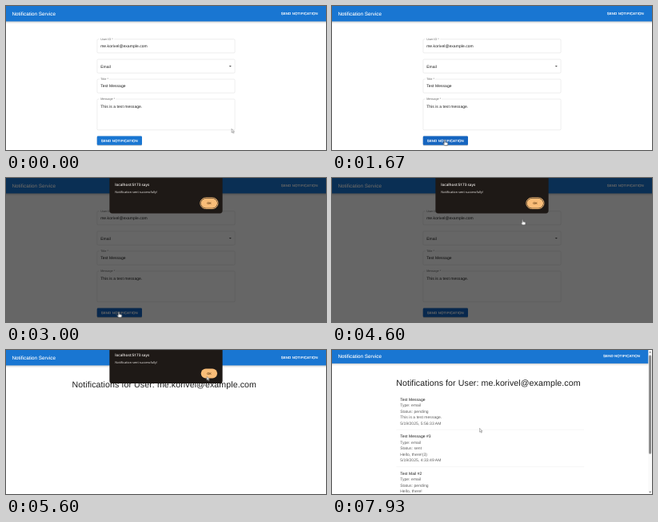
Recreate the animation shown at these times as an HTML page. Size 400x181 px, loop 8000 ms.

```html
<!DOCTYPE html>
<html lang="en">
<head>
<meta charset="utf-8">
<title>Notification Service</title>
<style>
  /* Typed properties keep moving text sharp: it is repainted, not resampled. */
  @property --gutter { syntax: "<length>"; inherits: true; initial-value: 0px; }
  @property --scroll { syntax: "<length>"; inherits: true; initial-value: 0px; }

  html, body { margin: 0; width: 100%; height: 100%; overflow: hidden; background: #fff; }
  svg { display: block; width: 100vw; height: 100vh; }
  text { font: 16px "Liberation Sans", Arial, sans-serif; letter-spacing: .15px; fill: #1c1c1c; text-rendering: geometricPrecision; }

  .bar { fill: #1976d2; filter: drop-shadow(0 3px 3px rgba(0, 0, 0, .25)); }
  .brand { font-size: 20px; fill: #fff; stroke: #fff; stroke-width: .3; }
  .action { font-size: 14px; letter-spacing: .4px; fill: #fff; stroke: #fff; stroke-width: .5; }
  .box { fill: none; stroke: rgba(0, 0, 0, .23); }
  .notch { fill: #fff; }
  .label { font-size: 12px; fill: #666; }
  .submit { filter: drop-shadow(0 2px 2px rgba(0, 0, 0, .3)); }
  .heading { font-size: 34px; letter-spacing: .25px; }
  .detail { fill: #5c5c5c; }
  .divider { stroke: rgba(0, 0, 0, .12); }
  .alert text { font-family: "Open Sans", sans-serif; letter-spacing: 0; fill: #f3efec; }
  .alert .host { font-size: 14.8px; font-weight: 600; }
  .alert .note { font-size: 12.3px; }
  .alert .ok { font-size: 12px; font-weight: 600; fill: #4c2a06; text-anchor: middle; }

  /* Every part shares one 8 s clock. */
  .page, .form, .results, .list, .submit, .dim, .alert, .ring,
  .thumb, .pointer, .arrow, .hand { animation: 8s linear infinite; }
  .form, .results, .list, .ring, .arrow, .hand { animation-timing-function: step-end; }

  .form { animation-name: form; }
  @keyframes form { 0% { visibility: visible } 68.75%, 100% { visibility: hidden } }
  .results { animation-name: results; }
  @keyframes results { 0% { visibility: hidden } 68.75%, 100% { visibility: visible } }
  .list { animation-name: list; }
  @keyframes list { 0% { visibility: hidden } 71.5%, 100% { visibility: visible } }

  .page { animation-name: page; transform: translateY(var(--scroll)); }
  @keyframes page {
    0%, 71.49% { --gutter: 0px; --scroll: 0px }
    71.5%, 96.5% { --gutter: 15px; --scroll: 0px }
    97.5% { --gutter: 15px; --scroll: -3px }
    99.1%, 100% { --gutter: 15px; --scroll: -8px }
  }
  .bar-action { transform: translateX(calc(-1 * var(--gutter))); }
  .heading { transform: translateX(calc(-.5 * var(--gutter))); }
  .thumb { animation-name: thumb; }
  @keyframes thumb { 0%, 96.5% { transform: none } 99.1%, 100% { transform: translateY(5px) } }

  .submit { animation-name: hover; }
  @keyframes hover { 0%, 9.5% { fill: #1976d2 } 12.5%, 100% { fill: #1565c0 } }
  .dim { animation-name: dim; }
  @keyframes dim { 0%, 34% { opacity: 0 } 35.2%, 67.8% { opacity: .6 } 69%, 100% { opacity: 0 } }
  .alert { animation-name: alert; }
  @keyframes alert {
    0%, 34% { opacity: 0; transform: translateY(-16px) }
    35.5%, 68.75% { opacity: 1; transform: none }
    70.2% { opacity: 1; transform: translateY(-8px) }
    71.3%, 100% { opacity: 0; transform: translateY(-16px) }
  }
  .ring { animation-name: ring; }
  @keyframes ring { 0% { visibility: visible } 68.5%, 100% { visibility: hidden } }

  .pointer { animation-name: pointer; }
  @keyframes pointer {
    0%, 1% { transform: translate(902px, 494px); animation-timing-function: ease-in-out }
    10.5%, 40% { transform: translate(451px, 538px); animation-timing-function: ease-in-out }
    55% { transform: translate(748px, 182px) }
    57.5%, 59% { transform: translate(762px, 166px); animation-timing-function: ease-in-out }
    63.5%, 72% { transform: translate(803px, 107px); animation-timing-function: ease-in-out }
    79%, 81% { transform: translate(686px, 224px); animation-timing-function: ease-in-out }
    86.3%, 100% { transform: translate(590px, 315px) }
  }
  .arrow { animation-name: arrow; }
  @keyframes arrow { 0% { visibility: visible } 9.8% { visibility: hidden } 61%, 100% { visibility: visible } }
  .hand { animation-name: hand; }
  @keyframes hand { 0% { visibility: hidden } 9.8% { visibility: visible } 61%, 100% { visibility: hidden } }
</style>
</head>
<body>
<svg viewBox="0 0 1280 579.2" preserveAspectRatio="none">
  <rect width="1280" height="580" fill="#fff"/>

  <g class="page">
    <rect class="bar" x="-10" y="-10" width="1300" height="72"/>
    <text class="brand" x="24" y="38.5">Notification Service</text>
    <text class="action bar-action" x="1100" y="36.5">SEND NOTIFICATION</text>

    <g class="form">
      <rect class="box" x="364.5" y="133.5" width="551" height="55" rx="4"/>
      <rect class="notch" x="373" y="131" width="60" height="6"/>
      <text class="label" x="378" y="137.5">User ID *</text>
      <text x="378" y="167">me.korivel@example.com</text>

      <rect class="box" x="364.5" y="214.5" width="551" height="55" rx="4"/>
      <text x="378" y="248">Email</text>
      <path d="M892 240h10l-5 5z" fill="#444"/>

      <rect class="box" x="364.5" y="294.5" width="551" height="55" rx="4"/>
      <rect class="notch" x="373" y="292" width="39" height="6"/>
      <text class="label" x="378" y="298.5">Title *</text>
      <text x="378" y="327">Test Message</text>

      <rect class="box" x="364.5" y="374.5" width="551" height="124" rx="4"/>
      <rect class="notch" x="373" y="372" width="66" height="6"/>
      <text class="label" x="378" y="378.5">Message *</text>
      <text x="378" y="408">This is a test message.</text>

      <rect class="submit" x="364" y="523" width="180" height="36.5" rx="4"/>
      <text class="action" x="380" y="546">SEND NOTIFICATION</text>
    </g>

    <g class="results">
      <text class="heading" x="264" y="151">Notifications for User: me.korivel@example.com</text>
      <g class="list">
        <g transform="translate(272.5 212)">
          <text>Test Message</text>
          <text class="detail" y="24">Type: email</text>
          <text class="detail" y="48">Status: pending</text>
          <text class="detail" y="72">This is a test message.</text>
          <text class="detail" y="96">5/19/2025, 5:56:33 AM</text>
          <path class="divider" d="M-16 116.5h752"/>
        </g>
        <g transform="translate(272.5 361)">
          <text>Test Message #3</text>
          <text class="detail" y="24">Type: email</text>
          <text class="detail" y="48">Status: sent</text>
          <text class="detail" y="72">Hello, there!(3)</text>
          <text class="detail" y="96">5/19/2025, 4:33:49 AM</text>
          <path class="divider" d="M-16 116.5h752"/>
        </g>
        <g transform="translate(272.5 510)">
          <text>Test Mail #2</text>
          <text class="detail" y="24">Type: email</text>
          <text class="detail" y="48">Status: pending</text>
          <text class="detail" y="72">Hello, there!</text>
        </g>
      </g>
    </g>
  </g>

  <g class="list">
    <rect x="1265" width="15" height="580" fill="#fafafa"/>
    <path d="M1268 11l4.5-6 4.5 6zM1268 569l4.5 6 4.5-6z" fill="#777"/>
    <rect class="thumb" x="1267.5" y="16" width="9.5" height="397" rx="4.5" fill="#858585"/>
  </g>

  <rect class="dim" width="1280" height="580"/>

  <g class="alert">
    <rect x="414" y="-30" width="452" height="172" rx="11" fill="#1e1916"/>
    <text class="host" x="436" y="32">localhost:5173 says</text>
    <text class="note" x="436" y="61">Notification sent successfully!</text>
    <rect class="ring" x="777" y="79.5" width="71" height="44" rx="22" fill="none" stroke="#f9bd78" stroke-width="3"/>
    <rect x="780" y="82.5" width="65" height="38" rx="19" fill="#f9bd78"/>
    <text class="ok" x="812.5" y="106">OK</text>
  </g>

  <g class="pointer" stroke-linejoin="round">
    <path class="arrow" d="M0 0v15l4-3 3 6 2.5-1.500-3-5.500h5z" fill="#fff" stroke="#555" stroke-width="1.5"/>
    <path class="hand" d="M-2 2q2-4 4 0v7l8 2q3 1 3 4l-2 8h-11l-7-8q-1-3 2-2l3 2z" fill="#fff" stroke="#111" stroke-width="1.5"/>
  </g>
</svg>
</body>
</html>
```
